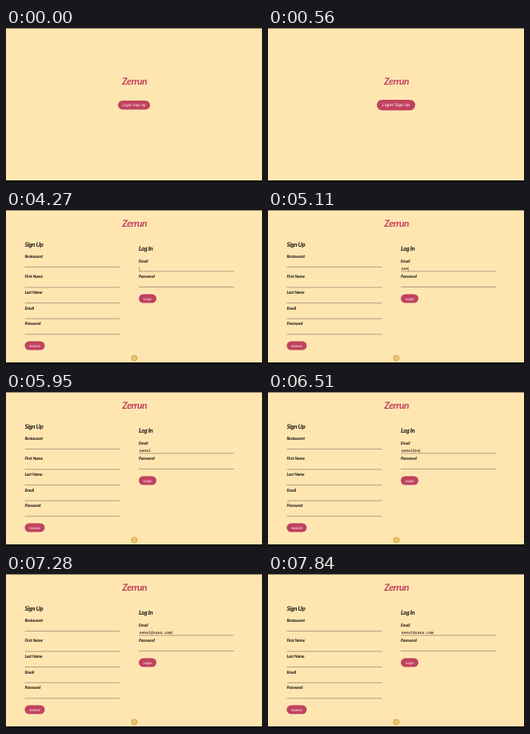
Animation, 320 px wide and 193 px high, one loop 8000 ms. Source, as an HTML page:

```html
<!DOCTYPE html>
<html lang="en">
<head>
<meta charset="utf-8">
<title>Sign up</title>
<style>
  html, body { margin: 0; width: 100%; height: 100%; overflow: hidden; background: #ffe6b1; }
  svg { display: block; width: 100vw; height: 100vh; }
  text { text-rendering: geometricPrecision; }
  .script { font-family: Lato, sans-serif; font-style: italic; font-weight: 700; fill: #17110d; }
  .brand { font-size: 12px; letter-spacing: -0.5px; fill: #c23f5b; text-anchor: middle; }
  .heading { font-size: 7.8px; letter-spacing: -0.35px; }
  .label { font-size: 5.3px; letter-spacing: -0.2px; }
  .pill { fill: #c04260; }
  .caption { font: 4.4px "Liberation Sans", Arial, sans-serif; fill: #fff; text-anchor: middle; }
  .typed { font: 700 4.82px "Liberation Mono", monospace; fill: #3a2f26; }
  .rule { fill: #b39f80; }
</style>
</head>
<body>
<svg viewBox="0 0 320 193" preserveAspectRatio="none">
  <rect width="320" height="193" fill="#ffe6b1"/>
  <rect width="320" height="1" fill="#8d7e68"/>
  <rect y="191" width="320" height="2" fill="#0b0806"/>
  <g id="splash"></g>
  <g id="forms"></g>
</svg>
<script>
const LOOP = 8000, HOVER = 560, OPEN = 2170, FOCUS = 4270;
const EMAIL = "senul@vaxo.com", BRAND = "Zerrun";
const START_X = 166.5, ADVANCE = 2.892;
const KEY_TIMES = [4760, 4970, 5110, 5250, 5460, 6090, 6370, 6510, 6650, 6790, 6930, 7070, 7140, 7280];
const CARET_OFF = [[5950, 6090], [7840, LOOP]];

const splash = document.getElementById("splash");
const forms = document.getElementById("forms");

function add(parent, tag, attrs, text = "") {
  const el = document.createElementNS("http://www.w3.org/2000/svg", tag);
  for (const key in attrs) el.setAttribute(key, attrs[key]);
  el.textContent = text;
  return parent.appendChild(el);
}

function write(parent, x, y, kind, text) {
  return add(parent, "text", { x, y, class: kind }, text);
}

function button(parent, cx, cy, width, height, text) {
  const group = add(parent, "g", { transform: `translate(${cx} ${cy})` });
  const inner = add(group, "g", {});
  add(inner, "rect", { x: -width / 2, y: -height / 2, width, height, rx: height / 2, class: "pill" });
  write(inner, 0, 1.5, "caption", text);
  return inner;
}

function field(x, lineY, text, gap = 11.2) {
  write(forms, x, lineY - gap, "script label", text);
  add(forms, "rect", { x, y: lineY, width: 119, height: 1, class: "rule" });
}

write(splash, 160.5, 71.4, "script brand", BRAND);
const enter = button(splash, 160, 96.6, 40, 11.2, "Login/ Sign Up");

write(forms, 160.6, 20.8, "script brand", BRAND);
write(forms, 23.5, 46, "script heading", "Sign Up");
field(23.5, 71, "Restaurant", 10.6);
["First Name", "Last Name", "Email", "Password"]
  .forEach((text, i) => field(23.5, 96.5 + i * 19.6, text));
button(forms, 35.9, 170, 25, 11.2, "Submit");

write(forms, 166, 51.4, "script heading", "Log In");
field(166, 76.4, "Email", 10.6);
field(166, 96, "Password", 10.6);
button(forms, 177, 111, 22, 11.2, "Login");

// Back button
add(forms, "circle", { cx: 160.4, cy: 185.6, r: 4.1, fill: "#e2b75c" });
add(forms, "path", { d: "M161.6 183.3L159.3 185.6L161.6 187.9", fill: "none", stroke: "#fff0cd", "stroke-width": 1 });

const typed = write(forms, START_X, 75.2, "typed", "");
const caret = add(forms, "rect", { y: 71, width: 0.6, height: 6, fill: "#8a7961" });

function show(el, visible) {
  el.setAttribute("visibility", visible ? "visible" : "hidden");
}

function draw() {
  const t = performance.now() % LOOP;
  const count = KEY_TIMES.filter(time => time <= t).length;
  const text = EMAIL.slice(0, count);
  const blink = CARET_OFF.some(([from, to]) => t >= from && t < to);
  show(splash, t < OPEN);
  show(forms, t >= OPEN);
  enter.setAttribute("transform", `scale(${t < HOVER ? 1 : 1.2})`);
  if (typed.textContent !== text) typed.textContent = text;
  caret.setAttribute("x", START_X + count * ADVANCE);
  show(caret, t >= FOCUS && !blink);
  requestAnimationFrame(draw);
}
draw();
</script>
</body>
</html>
```
